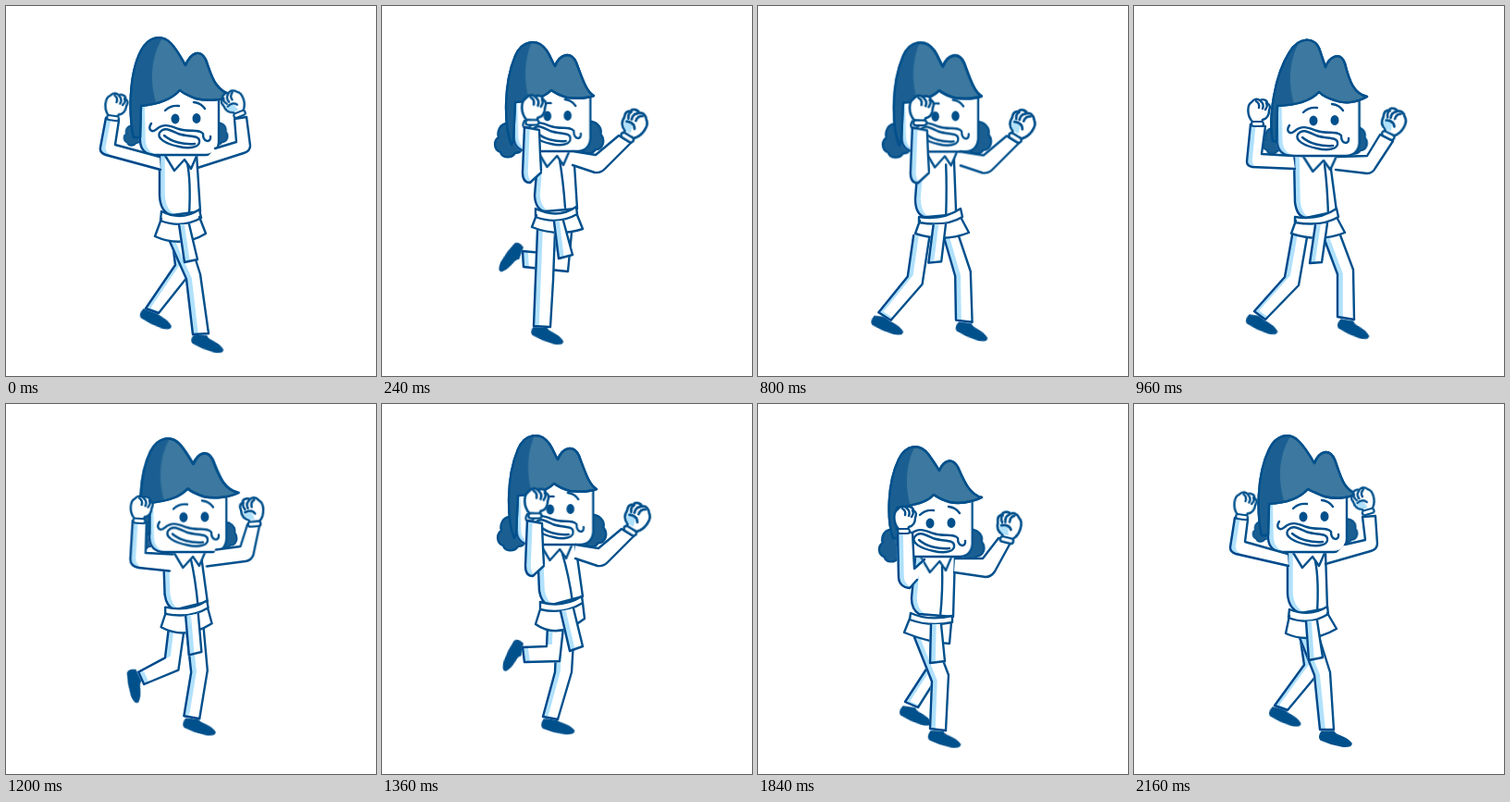
Write an HTML page without scripts that moves like this. It is 400 px wide and 400 px high and loops after 2240 ms.

```html
<!DOCTYPE html>
<html lang="en">
<head>
<meta charset="utf-8">
<title>Dancing man</title>
<style>
html, body { margin: 0; width: 100%; height: 100%; overflow: hidden; background: #fff; }
svg { display: block; width: 100vw; height: 100vh; }
path, ellipse { stroke: #00508c; stroke-width: 2.4; stroke-linecap: round; stroke-linejoin: round; fill: #fff; }
.line { fill: none; }
.shade { filter: url(#shade); }
.dark { fill: #1b5f92; }
.ink { fill: #00508c; }
.pale { fill: #b0e1fb; }

/* slow: whole routine; fast: one beat of the upper body */
.slow { animation: 2240ms -3ms infinite; }
.fast { animation: 560ms -3ms infinite; }
.sway { animation-name: sway; }
.torso { animation-name: torso; }
.placket { animation-name: placket; }
.skirt { animation-name: skirt; }
.sash { animation-name: sash; }
.legA { animation-name: legA; }
.legB { animation-name: legB; }
.footA { animation-name: footA; }
.footB { animation-name: footB; }
.open { animation-name: open; }
.plate { animation-name: plate; }
.look { animation-name: look; }
.hair { animation-name: hair; }
.bunL { animation-name: bunL; }
.bunR { animation-name: bunR; }
.armL { animation-name: armL; }
.armR { animation-name: armR; }
.fistL { animation-name: fistL; }
.fistR { animation-name: fistR; }

@keyframes sway {
  0% { transform: translate(0, 0); animation-timing-function: steps(3); }
  10.714% { transform: translate(0, 0); animation-timing-function: steps(4); }
  25% { transform: translate(11px, 1px); animation-timing-function: steps(5); }
  42.857% { transform: translate(14px, 0); animation-timing-function: steps(5); }
  60.714% { transform: translate(3px, -5px); animation-timing-function: steps(6); }
  82.142% { transform: translate(0, 0); animation-timing-function: steps(4); }
  96.428%, 100% { transform: translate(0, 0); animation-timing-function: steps(1); }
}
@keyframes torso {
  0%, 100% { d: path("M166 162L166 205Q167 224 180 226L210 222L206 160"); animation-timing-function: steps(3); }
  10.714% { d: path("M169 158L165 205Q166 220 176 222L211 219L207 156"); animation-timing-function: steps(4); }
  25% { d: path("M174 164L164 205Q162 222 172 227L207 230L213 164"); animation-timing-function: steps(5); }
  42.857% { d: path("M173 164L174 212Q176 228 186 229L219 222L211 162"); animation-timing-function: steps(5); }
  60.714% { d: path("M168 154L170 202Q172 214 180 218L217 208L209 151"); animation-timing-function: steps(6); }
  82.142% { d: path("M170 167L166 210Q166 222 174 227L211 230L213 164"); animation-timing-function: steps(4); }
  96.428% { d: path("M166 162L166 205Q167 222 180 226L209 221L207 160"); animation-timing-function: steps(1); }
}
@keyframes placket {
  0%, 100% { d: path("M196 170Q200 190 198 226"); animation-timing-function: steps(3); }
  10.714% { d: path("M192 166Q196 190 198 218"); animation-timing-function: steps(4); }
  25% { d: path("M199 172Q197 195 193 230"); animation-timing-function: steps(5); }
  42.857% { d: path("M206 171Q209 195 210 226"); animation-timing-function: steps(5); }
  60.714% { d: path("M195 162Q202 185 206 214"); animation-timing-function: steps(6); }
  82.142% { d: path("M199 176Q200 200 197 230"); animation-timing-function: steps(4); }
  96.428% { d: path("M196 170Q200 190 198 226"); animation-timing-function: steps(1); }
}
@keyframes skirt {
  0%, 100% { d: path("M209 228L216 246Q190 262 161 249L168 230M168 222Q190 233 209 220L211 229Q190 241 167 232Z"); animation-timing-function: steps(3); }
  10.714% { d: path("M211 226L217 241Q190 250 162 239L167 226M166 219Q190 231 210 217L211 225Q190 237 166 228Z"); animation-timing-function: steps(4); }
  25% { d: path("M209 233L213 240L203 256Q182 250 159 250L161 227M162 221Q185 233 210 229L210 235Q185 240 161 228Z"); animation-timing-function: steps(5); }
  42.857% { d: path("M220 230L228 245Q200 256 170 246L175 232M174 228Q200 232 219 219L221 228Q203 239 174 234Z"); animation-timing-function: steps(5); }
  60.714% { d: path("M217 215L219 232Q190 255 166 238L171 222M171 214Q195 221 216 208L217 215Q196 228 171 222Z"); animation-timing-function: steps(6); }
  82.142% { d: path("M209 236L207 259Q185 258 158 247L164 232M165 226Q185 235 210 229L210 236Q185 241 164 233Z"); animation-timing-function: steps(4); }
  96.428% { d: path("M209 226L219 243Q190 260 164 248L168 229M168 222Q190 231 209 219L210 227Q190 240 167 231Z"); animation-timing-function: steps(1); }
}
@keyframes sash {
  0%, 100% { d: path("M187 236L193 277L207 274L198 236"); animation-timing-function: steps(3); }
  10.714% { d: path("M186 233L191 273L206 269L196 232"); animation-timing-function: steps(4); }
  25% { d: path("M180 236L176 277L191 275L194 237"); animation-timing-function: steps(5); }
  42.857% { d: path("M196 237L190 278L203 277L209 235"); animation-timing-function: steps(5); }
  60.714% { d: path("M193 224L203 267L217 262L207 221"); animation-timing-function: steps(6); }
  82.142% { d: path("M187 238L186 280L202 278L198 238"); animation-timing-function: steps(4); }
  96.428% { d: path("M186 235L189 277L204 274L198 234"); animation-timing-function: steps(1); }
}
@keyframes legA {
  0%, 100% { d: path("M175 250L195 295L202 355L219 354L210 290L198 252"); animation-timing-function: steps(3); }
  10.714% { d: path("M168 243L166 295L164 346L182 347L185 297L187 244"); animation-timing-function: steps(4); }
  25% { d: path("M164 248L160 292L131 333L146 341L177 299L183 248"); animation-timing-function: steps(5); }
  42.857% { d: path("M171 248L163 293L130 330L142 339L178 302L187 250"); animation-timing-function: steps(5); }
  60.714% { d: path("M179 240L178 262L152 263L154 279L192 278L196 242"); animation-timing-function: steps(6); }
  82.142% { d: path("M169 252L188 300L186 351L203 353L206 293L192 256"); animation-timing-function: steps(4); }
  96.428% { d: path("M178 250L195 293L201 352L216 352L212 290L200 252"); animation-timing-function: steps(1); }
}
@keyframes legB {
  0%, 100% { d: path("M180 255L183 280L151 327L165 332L196 293L196 255"); animation-timing-function: steps(3); }
  10.714% { d: path("M186 245L185 268L152 265L153 282L201 287L205 245"); animation-timing-function: steps(4); }
  25% { d: path("M195 250L203 295L205 345L222 346L219 290L208 250"); animation-timing-function: steps(5); }
  42.857% { d: path("M205 250L220 290L220 336L238 339L237 285L222 245"); animation-timing-function: steps(5); }
  60.714% { d: path("M189 245L187 290L174 338L190 341L205 290L208 240"); animation-timing-function: steps(6); }
  82.142% { d: path("M175 255L183 285L159 322L173 328L197 290L190 256"); animation-timing-function: steps(4); }
  96.428% { d: path("M180 255L184 282L152 326L166 331L196 295L196 258"); animation-timing-function: steps(1); }
}
@keyframes footA {
  0%, 100% { transform: translate(210px, 355px) rotate(6deg); animation-timing-function: steps(3); }
  10.714% { transform: translate(171px, 346px) rotate(6deg); animation-timing-function: steps(4); }
  25% { transform: translate(134px, 337px) rotate(4deg); animation-timing-function: steps(5); }
  42.857% { transform: translate(131px, 334px) rotate(9deg); animation-timing-function: steps(5); }
  60.714% { transform: translate(152px, 265px) rotate(100deg); animation-timing-function: steps(6); }
  82.142% { transform: translate(193px, 353px) rotate(2deg); animation-timing-function: steps(4); }
  96.428% { transform: translate(209px, 353px) rotate(0deg); animation-timing-function: steps(1); }
}
@keyframes footB {
  0%, 100% { transform: translate(155px, 328px) rotate(10deg); animation-timing-function: steps(3); }
  10.714% { transform: translate(151px, 267px) rotate(110deg); animation-timing-function: steps(4); }
  25% { transform: translate(214px, 346px) rotate(6deg); animation-timing-function: steps(5); }
  42.857% { transform: translate(230px, 339px) rotate(9deg); animation-timing-function: steps(5); }
  60.714% { transform: translate(181px, 340px) rotate(-2deg); animation-timing-function: steps(6); }
  82.142% { transform: translate(163px, 327px) rotate(8deg); animation-timing-function: steps(4); }
  96.428% { transform: translate(156px, 328px) rotate(8deg); animation-timing-function: steps(1); }
}
@keyframes open {
  0%, 100% { visibility: hidden; animation-timing-function: step-end; }
  21.428% { visibility: visible; animation-timing-function: step-end; }
  32.142% { visibility: hidden; animation-timing-function: step-end; }
}
@keyframes plate {
  0%, 100% { transform: translate(0, 0) scale(1, 1); animation-timing-function: steps(2); }
  28.571% { transform: translate(12px, 4px) scale(.955, 1); animation-timing-function: steps(1); }
  42.857% { transform: translate(1px, -4px) scale(.975, 1); animation-timing-function: steps(2); }
  71.428% { transform: translate(-11px, 1px) scale(1.046, 1); animation-timing-function: steps(1); }
  85.714% { transform: translate(0, -1px) scale(1, 1); animation-timing-function: steps(1); }
}
@keyframes look {
  0%, 100% { transform: translate(0, 0) scale(1, 1); animation-timing-function: steps(2); }
  28.571% { transform: translate(3px, 7px) scale(1, 1); animation-timing-function: steps(1); }
  42.857% { transform: translate(5px, -3px) scale(.95, 1); animation-timing-function: steps(2); }
  71.428% { transform: translate(-3px, 2px) scale(1, 1); animation-timing-function: steps(1); }
  85.714% { transform: translate(0, 0) scale(1, 1); animation-timing-function: steps(1); }
}
@keyframes hair {
  0%, 100% { d: path("M138 142C133 120 132 75 146 48C154 33 168 30 178 40C185 47 190 57 194 64C200 50 210 46 216 58C222 74 225 92 246 97C236 102 216 103 205 100C198 97 192 95 188 91C180 100 168 106 146 108L145 142Z"); animation-timing-function: steps(2); }
  28.571% { d: path("M146 145C139 125 140 85 152 60C160 44 174 42 184 54C189 61 193 67 196 72C201 60 210 58 216 68C223 84 229 98 242 101C230 107 216 108 207 106C200 104 194 101 190 98C183 106 172 109 150 112L150 145Z"); animation-timing-function: steps(1); }
  42.857% { d: path("M140 150C132 130 131 85 144 54C151 37 168 34 178 48C182 54 184 60 187 65C192 52 204 48 210 61C216 77 221 93 229 97C218 101 208 100 200 99C193 97 187 94 183 91C176 98 166 103 144 104L142 145Z"); animation-timing-function: steps(2); }
  71.428% { d: path("M136 146C131 120 138 75 154 50C164 33 182 32 187 48C189 54 191 60 193 66C197 55 209 48 214 62C219 82 224 95 238 98C226 105 212 106 203 102C196 100 190 97 186 93C178 102 165 107 141 108L140 146Z"); animation-timing-function: steps(1); }
  85.714% { d: path("M138 142C133 120 132 78 146 49C154 33 168 30 178 40C185 47 191 57 195 64C200 51 211 47 217 60C223 76 226 93 241 97C232 102 216 103 206 100C199 97 193 95 188 92C180 101 168 107 146 108L145 142Z"); animation-timing-function: steps(1); }
}
@keyframes bunL {
  0%, 100% { transform: translate(137px, 140px) scale(.6); animation-timing-function: steps(2); }
  28.571% { transform: translate(146px, 153px) scale(.95); animation-timing-function: steps(1); }
  42.857% { transform: translate(138px, 145px) scale(1); animation-timing-function: steps(2); }
  71.428% { transform: translate(137px, 146px) scale(.75); animation-timing-function: steps(1); }
  85.714% { transform: translate(138px, 138px) scale(.6); animation-timing-function: steps(1); }
}
@keyframes bunR {
  0%, 100% { transform: translate(230px, 138px) scale(.65); animation-timing-function: steps(2); }
  28.571% { transform: translate(231px, 152px) scale(.9); animation-timing-function: steps(1); }
  42.857% { transform: translate(225px, 142px) scale(.95); animation-timing-function: steps(2); }
  71.428% { transform: translate(226px, 145px) scale(.8); animation-timing-function: steps(1); }
  85.714% { transform: translate(231px, 137px) scale(.7); animation-timing-function: steps(1); }
}
@keyframes armL {
  0%, 100% { d: path("M166 163L118 150L122 124L108 121L102 153Q101 159 108 161L167 177"); animation-timing-function: steps(2); }
  28.571% { d: path("M180 168L169 178L167 139L151 138L152 188Q153 198 164 199L172 190"); animation-timing-function: steps(1); }
  42.857% { d: path("M172 178L171 160L170 134L154 131L152 180Q152 191 160 191L172 180"); animation-timing-function: steps(2); }
  71.428% { d: path("M158 162L124 160L128 130L112 128L108 168Q108 173 114 174L160 176"); animation-timing-function: steps(1); }
  85.714% { d: path("M166 162L120 149L123 125L109 123L104 155Q104 160 110 162L167 175"); animation-timing-function: steps(1); }
}
@keyframes armR {
  0%, 100% { d: path("M226 154L249 147L247 122L260 120L264 151Q264 157 257 159L207 175"); animation-timing-function: steps(2); }
  28.571% { d: path("M213 167L243 167L260 145L273 150L256 181Q252 187 246 187L212 182"); animation-timing-function: steps(1); }
  42.857% { d: path("M206 157L231 161L256 140L269 148L241 176Q236 181 230 180L206 172"); animation-timing-function: steps(1); }
  57.142% { d: path("M206 160L236 165L262 141L275 149L247 177Q243 182 236 182L205 175"); animation-timing-function: steps(1); }
  71.428% { d: path("M206 163L238 162L252 139L266 146L247 175Q244 181 238 181L204 177"); animation-timing-function: steps(1); }
  85.714% { d: path("M228 152L250 147L247 122L261 121L263 151Q263 157 256 159L207 173"); animation-timing-function: steps(1); }
}
@keyframes fistL {
  0%, 100% { transform: translate(119px, 108px) rotate(8deg); animation-timing-function: steps(2); }
  28.571% { transform: translate(159px, 124px) rotate(0deg); animation-timing-function: steps(1); }
  42.857% { transform: translate(164px, 111px) rotate(0deg) scale(1.1); animation-timing-function: steps(2); }
  71.428% { transform: translate(121px, 114px) rotate(0deg); animation-timing-function: steps(1); }
  85.714% { transform: translate(120px, 109px) rotate(8deg); animation-timing-function: steps(1); }
}
@keyframes fistR {
  0%, 100% { transform: translate(246px, 105px) rotate(-22deg); animation-timing-function: steps(2); }
  28.571% { transform: translate(271px, 132px) rotate(14deg) scale(1.12); animation-timing-function: steps(1); }
  42.857% { transform: translate(272px, 128px) rotate(32deg) scale(1.15); animation-timing-function: steps(1); }
  57.142% { transform: translate(279px, 129px) rotate(30deg) scale(1.12); animation-timing-function: steps(1); }
  71.428% { transform: translate(266px, 126px) rotate(27deg) scale(1.1); animation-timing-function: steps(1); }
  85.714% { transform: translate(248px, 104px) rotate(-16deg); animation-timing-function: steps(1); }
}
</style>
</head>
<body>
<svg viewBox="0 0 400 400">
  <defs>
    <filter id="shade" x="-20%" y="-20%" width="140%" height="140%" color-interpolation-filters="sRGB">
      <feOffset in="SourceAlpha" dx="6.500" dy="-1.500" result="moved"/>
      <feFlood flood-color="#b0e1fb"/>
      <feComposite in2="SourceAlpha" operator="in"/>
      <feComposite in2="moved" operator="out"/>
      <feBlend in2="SourceGraphic" mode="multiply"/>
    </filter>
    <clipPath id="hairClip"><path class="hair fast"/></clipPath>
    <path id="bun" class="dark" d="M-4-18C6-20 14-12 12-4C18 4 14 14 6 14C2 20-8 20-10 13C-18 10-17 0-12-3C-14-10-10-17-4-18Z"/>
    <path id="shoe" class="ink" style="stroke-width:1.5" d="M-6 1Q-10 7-7 10Q4 15 16 17Q26 18 26 14Q22 9 14 6Q8 4 7 1Z"/>
    <g id="fist">
      <path d="M-7 11C-13 5-13-7-8-10C-5-14-1-14 1-12C5-14 9-12 9-9C13-7 12-4 11-1C11 5 8 8 4 9L3 12Z"/>
      <path class="line" d="M-3-11Q1-9 0-4M2-11Q6-8 4-3M8-9Q10-6 7-2"/>
      <rect x="-8" y="11" width="13" height="5" rx="2.500" fill="#fff" stroke="#00508c" stroke-width="2.200"/>
    </g>
  </defs>

  <g class="sway slow">
    <use href="#bun" class="bunL fast"/>
    <use href="#bun" class="bunR fast"/>
  </g>

  <use href="#shoe" class="footB slow"/>
  <path class="legB slow shade"/>
  <use href="#shoe" class="footA slow"/>
  <path class="legA slow shade"/>
  <path class="torso slow shade"/>
  <path class="placket slow line"/>
  <path class="skirt slow"/>
  <path class="sash slow shade"/>

  <g class="sway slow">
    <g class="plate fast">
      <path d="M171 160L182 178L193 166L200 176L207 160Z"/>
      <path class="shade" d="M144 100L145 146Q146 160 160 161L216 161Q229 160 230 147L230 103"/>
    </g>
    <g class="look fast">
      <ellipse class="ink" cx="183" cy="122" rx="3.300" ry="4.200"/>
      <ellipse class="ink" cx="206" cy="121.500" rx="3.300" ry="4.200"/>
      <path class="line" d="M172 113Q178 107 187 108M203 104Q211 105 215 111"/>
      <path d="M166 137C163 143 172 149 187 152C200 155 210 152 209 146C209 139 197 142 186 138C177 134 171 130 166 137Z"/>
      <path class="line" d="M171 140C179 147 192 150 204 149"/>
      <g class="open slow">
        <path class="ink" d="M164 136C168 150 182 155 196 154C205 153 208 146 206 141C196 141 180 136 164 136Z"/>
        <path style="stroke:none" d="M168 137Q184 150 204 145L205 141Q185 140 168 137Z"/>
        <path class="pale" style="stroke:none" d="M177 149Q188 146 198 152Q188 155 177 149Z"/>
      </g>
      <path class="line" d="M157 127C153 133 157 138 163 133C171 126 178 130 187 133C198 137 208 132 213 138C213 148 222 148 221 141"/>
    </g>
    <path class="hair fast" style="fill:#3c789f"/>
    <g clip-path="url(#hairClip)">
      <path class="dark look fast" style="stroke:none" d="M105 20H180C156 46 152 80 166 116H152V165H105Z"/>
    </g>
    <path class="hair fast line"/>
    <path class="armR fast"/>
    <g class="fistR fast">
      <use href="#fist" transform="scale(-1 1)"/>
      <path class="pale" style="stroke:none" d="M-9-1C-9 5-6 8-2 9L2 9Q1 2-3 0Z"/>
      <path class="line" d="M-7 1Q0-2 3 3"/>
    </g>
    <path class="armL fast shade"/>
    <use href="#fist" class="fistL fast"/>
  </g>
</svg>
</body>
</html>
```
